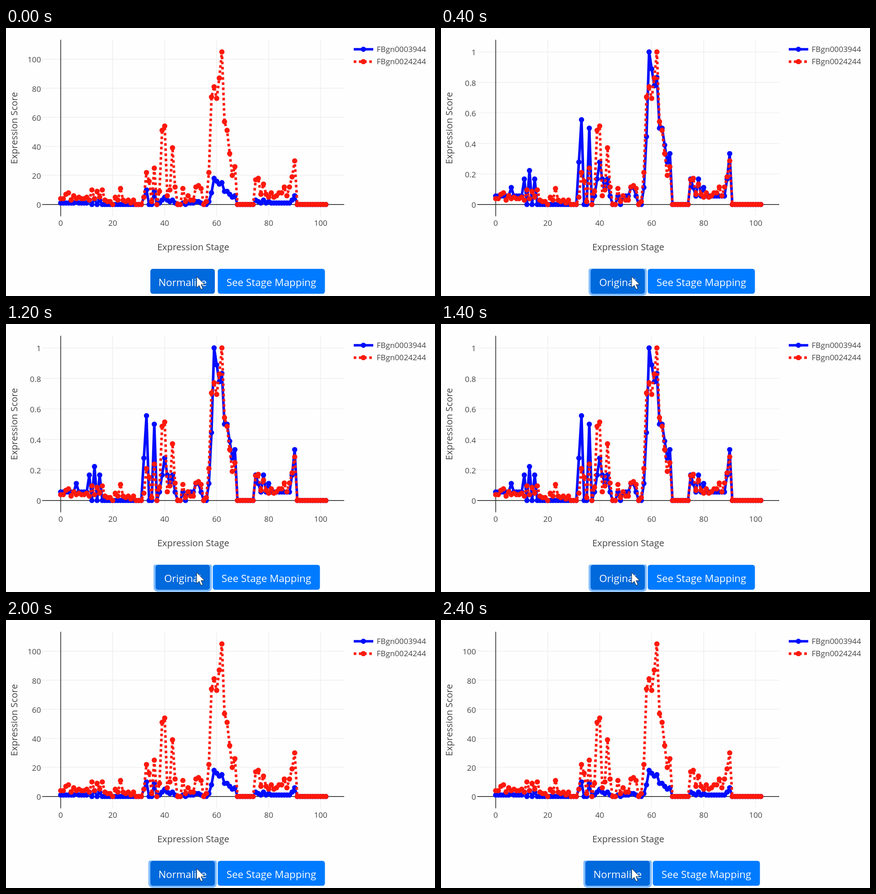
Animation of 945 by 592 pixels, one loop 3400 ms. Source, as an HTML page:

```html
<!DOCTYPE html>
<html lang="en">
<head>
<meta charset="utf-8">
<title>Expression chart</title>
<style>
  html, body { margin: 0; width: 100%; height: 100%; overflow: hidden; background: #fefefe; }
  svg { display: block; }
  text { font: 17.2px "Open Sans", "Noto Sans", sans-serif; fill: #444; }
  .title { font-size: 20.1px; }
  .btn { font-size: 22.3px; fill: #fff; }
  .mid { text-anchor: middle; }
  .end { text-anchor: end; }
  .grid { stroke: #eee; stroke-width: 1.5; }
  .zero { stroke: #333; stroke-width: 1.7; }
  .trace { fill: none; stroke-width: 5.7; stroke-miterlimit: 2; }
</style>
</head>
<body>
<svg id="stage" width="945" height="592" viewBox="0 0 945 592"></svg>
<script>
const LOOP = 3400, NORMALIZE_AT = 200, RESTORE_AT = 2000;
const BLUE = '#000cfe', RED = '#fe180b';
const rep = (n, v) => Array(n).fill(v);

const blue = [
  ...rep(6, 1), 2, ...rep(4, 1), 3, 0, 4, 0, 3, ...rep(16, 0),
  5, 10, 0, 0, 9, 0, 1, 3, 5, 3, 2, 3, 1, 0, 0, 1, 0, 1, 1, 1, 2, 2, 1, 0, 0,
  2, 8, 18, 16, 14, 15, 9, 9, 7, 5, 6, ...rep(7, 0),
  3, 2, 1, 3, 1, 2, ...rep(8, 1), 3, 6, ...rep(12, 0)
];
const red = [
  4, 4, 7, 8, 3, 6, 4, 5, 4, 4, 5, 3, 10, 4, 9, 5, 10, 3, 2, 2,
  0, 5, 3, 11, 3, 2, 3, 1, 3, 0, 0, 0, 5, 22, 16, 2, 25, 0, 9, 51,
  54, 6, 10, 39, 12, 0, 0, 11, 2, 6, 3, 3, 12, 13, 11, 0, 2, 22, 74, 81,
  73, 87, 105, 57, 51, 35, 20, 26, ...rep(7, 0),
  17, 18, 7, 14, 7, 5, 8, 5, 6, 8, 8, 12, 6, 12, 19, 30, ...rep(12, 0)
];

const px = x => 120.5 + x * 5.727;
const py = (v, max) => 389.8 - v / max * 337;
const line = (x1, y1, x2, y2, cls) =>
  `<line x1="${x1}" y1="${y1}" x2="${x2}" y2="${y2}" class="${cls}"/>`;
const text = (x, y, s, cls = '', extra = '') =>
  `<text x="${x}" y="${y}" class="${cls}" ${extra}>${s}</text>`;

// Polyline followed by a round marker on each of the given points
function trace(points, color, dotted, markers = points) {
  const dash = dotted ? 'stroke-dasharray="5.7"' : '';
  return `<polyline points="${points.join(' ')}" class="trace" stroke="${color}" ${dash}/>` +
    markers.map(([x, y]) => `<circle cx="${x}" cy="${y}" r="5.8" fill="${color}"/>`).join('');
}
const series = (data, max, color, dotted) =>
  trace(data.map((v, i) => [px(i), py(v, max)]), color, dotted);

function legend(y, label, color, dotted) {
  return trace([[766, y], [809, y]], color, dotted, [[787.3, y]]) + text(816.5, y + 6, label);
}

function button(x, width, label, fill) {
  return `<rect x="${x}" y="532" width="${width}" height="55" rx="5.5" fill="${fill}"/>` +
    text(x + width / 2, 570, label, 'btn mid');
}

function chart(top, step, blueMax, redMax) {
  let s = '';
  for (let x = 0; x <= 100; x += 20) {
    if (x) s += line(px(x), 26, px(x), 416, 'grid');
    s += text(px(x), 437, x, 'mid');
  }
  for (let i = 0; i <= 5; i++) {
    const y = py(i * step, top);
    if (i) s += line(80, y, 745, y, 'grid');
    s += text(77, y + 7.6, +(i * step).toFixed(1), 'end');
  }
  return s + line(80, 389.8, 745, 389.8, 'zero') + line(120.5, 26, 120.5, 416, 'zero') +
    series(blue, blueMax, BLUE, false) + series(red, redMax, RED, true);
}

function controls(x, width, label) {
  return `<rect class="ring" x="${x - 4.4}" y="527.6" width="${width + 8.8}" height="63.8" rx="9"
      fill="#80bdff" clip-path="url(#below)"/>` +
    button(x, width, label, '#0069dc') +
    button(x + width + 6.5, 236, 'See Stage Mapping', '#007bff');
}

const stage = document.getElementById('stage');
stage.innerHTML =
  '<clipPath id="below"><rect y="531.5" width="945" height="61"/></clipPath>' +
  `<g id="raw">${chart(105, 20, 105, 105)}${controls(318, 142, 'Normalize')}</g>` +
  `<g id="scaled">${chart(1, .2, 18, 105)}${controls(329.5, 119.5, 'Original')}</g>` +
  legend(47, 'FBgn0003944', BLUE, false) +
  legend(74.3, 'FBgn0024244', RED, true) +
  text(412.5, 491, 'Expression Stage', 'title mid') +
  text(0, 0, 'Expression Score', 'title mid', 'transform="translate(25 221) rotate(-90)"') +
  '<path d="M420 549V573.5L425.6 568.3L429.6 577.3L433.6 575.6L429.7 566.8H437.4Z" fill="#fff" stroke="#123" stroke-width="1"/>';

const raw = document.getElementById('raw');
const scaled = document.getElementById('scaled');
const ring = raw.querySelector('.ring');
const show = (el, on) => { el.style.display = on ? '' : 'none'; };

function render(now) {
  const t = now % LOOP;
  const normalized = t >= NORMALIZE_AT && t < RESTORE_AT;
  show(raw, !normalized);
  show(scaled, normalized);
  show(ring, t >= RESTORE_AT);
}

const start = performance.now();
function tick() {
  render(performance.now() - start);
  requestAnimationFrame(tick);
}
tick();
</script>
</body>
</html>
```
